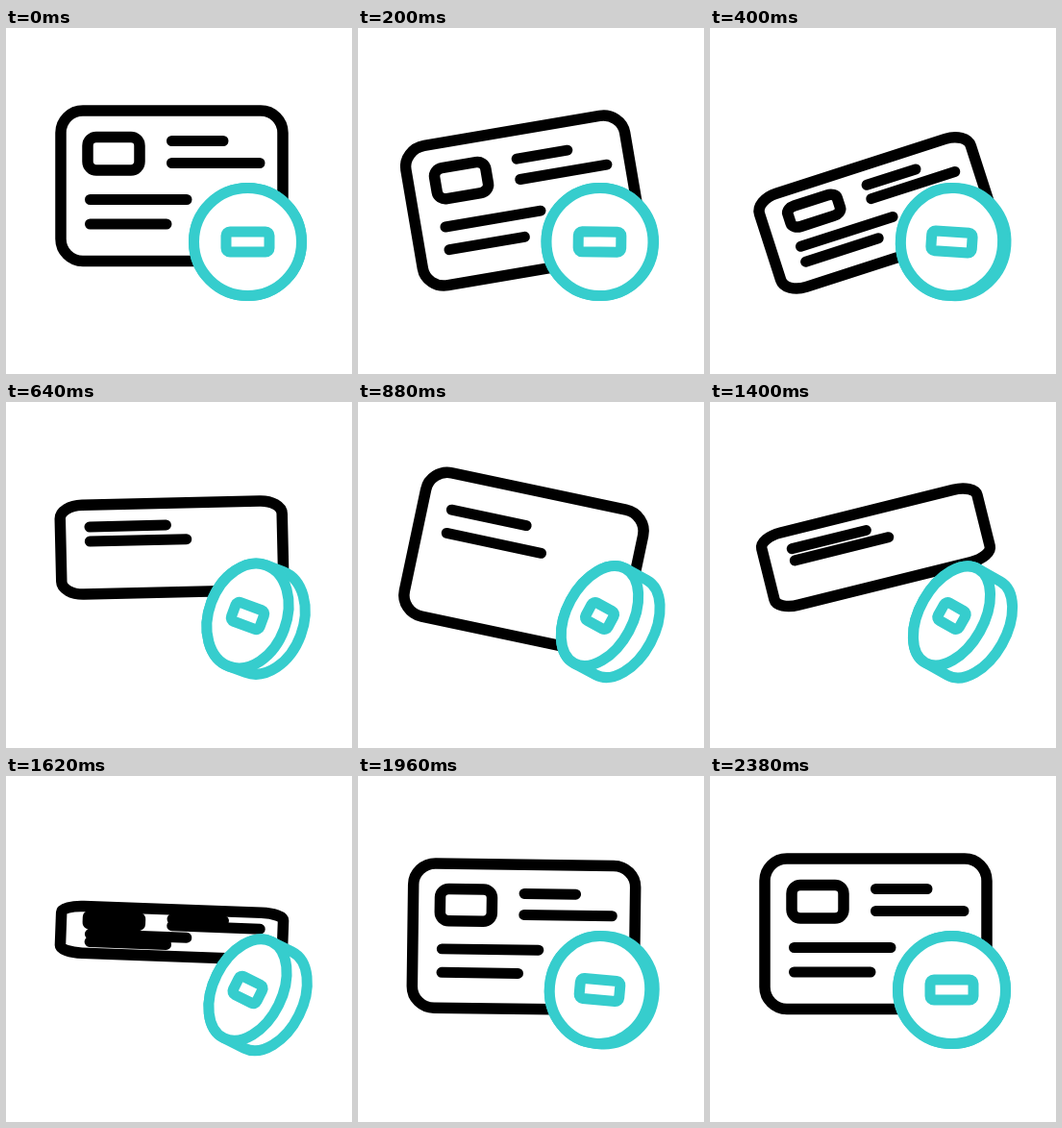
Write an HTML page without scripts that moves like this. It is 360x360 px and loops after 2400 ms.

```html
<!DOCTYPE html>
<html lang="en">
<head>
<meta charset="utf-8">
<title>Card and coin</title>
<style>
  @property --bob   { syntax: "<length>"; inherits: true; initial-value: 0px; }
  @property --swing { syntax: "<angle>";  inherits: true; initial-value: 0deg; }
  @property --flip  { syntax: "<number>"; inherits: true; initial-value: 1; }
  @property --turn  { syntax: "<number>"; inherits: true; initial-value: 0; }

  html, body { margin: 0; width: 100%; height: 100%; overflow: hidden; background: #fff; }
  svg { display: block; width: 100vw; height: 100vh; }

  .card {
    fill: none; stroke: #000; stroke-width: 11.5; stroke-linecap: round;
    transform: translateY(var(--bob)) rotate(var(--swing)) scaleY(var(--flip));
    animation: bob 2.4s infinite, swing 2.4s infinite, flip 2.4s infinite;
    animation-timing-function: cubic-bezier(.36, 0, .64, 1);
  }
  .card * { vector-effect: non-scaling-stroke; }
  .card path { stroke-width: 11; }
  /* clamps to 1 on the front side and 0 on the back */
  .front { opacity: calc(var(--flip) * 1000); }

  @keyframes bob {
    16% { --bob: 28.5px; }
    28% { --bob: -14px; }
    47% { --bob: 26px; }
    58% { --bob: -13px; }
    73% { --bob: 4px; }
  }
  @keyframes swing {
    16% { --swing: -18deg; }
    36% { --swing: 12deg; }
    59% { --swing: -14deg; }
    69% { --swing: 3deg; }
    88%, 100% { --swing: 0deg; }
  }
  @keyframes flip {
    0% { --flip: 1; animation-timing-function: cubic-bezier(.77, 0, .33, 1); }
    41.7% { --flip: -1; animation-timing-function: cubic-bezier(.52, 0, .45, 1); }
    87.5%, 100% { --flip: 1; }
  }

  .coin {
    --radius: calc(56px - 23px * var(--turn));
    fill: #fff; stroke: #36cdcd; stroke-width: 11;
    transform: rotate(calc(30deg * var(--turn)));
    animation: turn 1.2s cubic-bezier(.74, 0, .22, 1) infinite alternate;
  }
  .rim {
    x: calc(-1 * var(--radius)); width: calc(2 * var(--radius) + 27px * var(--turn));
    rx: var(--radius); ry: 56px;
  }
  .face { rx: var(--radius); ry: 56px; }
  .slot { x: calc(-22.5px + 10px * var(--turn)); width: calc(45px - 20px * var(--turn)); }

  @keyframes turn { to { --turn: 1; } }
</style>
</head>
<body>
<svg viewBox="0 0 360 360">
  <g transform="translate(172.5 164.25)">
    <g class="card">
      <rect x="-115.5" y="-78.25" width="231" height="156.5" rx="23"/>
      <path d="M-85 14.25H15.5M-85 39.75H-5.5"/>
      <g class="front">
        <rect x="-87.5" y="-50.75" width="54" height="34.5" rx="9"/>
        <path d="M0 -46.75H53.5M0 -23.75H91.5"/>
      </g>
    </g>
  </g>
  <g transform="translate(251.5 222.5)">
    <g class="coin">
      <rect class="rim" y="-56" height="112"/>
      <ellipse class="face"/>
      <rect class="slot" y="-10.5" height="21" rx="4"/>
    </g>
  </g>
</svg>
</body>
</html>
```
